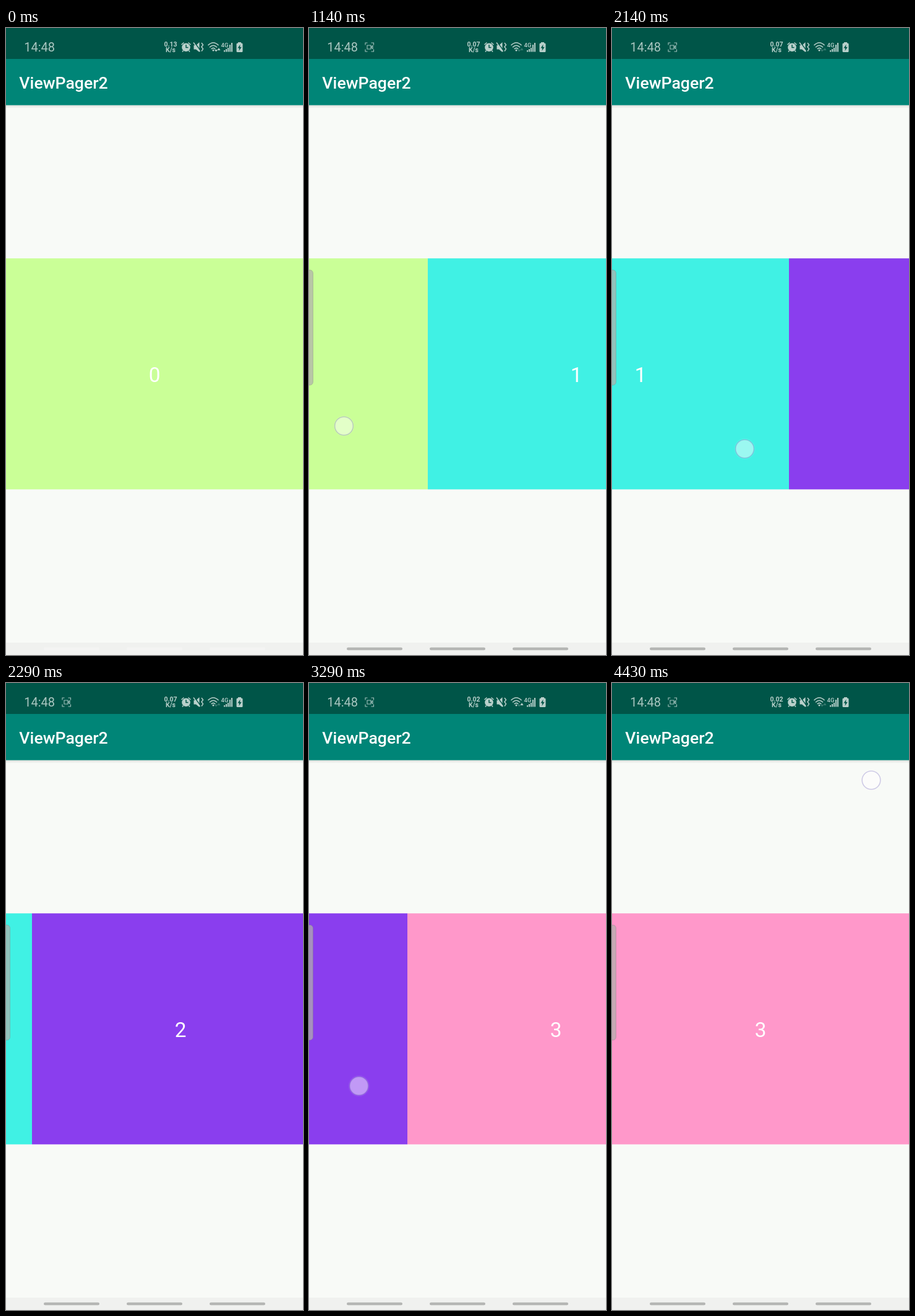
These frames come from a looping animation (480 px wide and 1013 px high, 4.57 s). An HTML page:

```html
<!DOCTYPE html>
<html lang="en">
<head>
<meta charset="utf-8">
<title>ViewPager2</title>
<style>
  html, body { margin: 0; width: 100%; height: 100%; overflow: hidden; background: #f8faf7; }
  svg { display: block; width: 100%; height: 100%; font-family: Roboto, sans-serif; }
  .icon { fill: #b9d0cb; }
  .line { fill: none; stroke: #b9d0cb; stroke-width: 1.5; }
  .thin { fill: none; stroke: #a3c2bc; stroke-width: 1.1; }
  .cut { fill: none; stroke: #005548; stroke-width: 1.5; }
  .tiny { font-weight: 700; font-size: 10.5px; text-anchor: middle; }
</style>
</head>
<body>
<svg viewBox="0 0 480 1013">
  <defs>
    <linearGradient id="shade" x2="0" y2="1">
      <stop stop-color="#000" stop-opacity=".11"/>
      <stop offset="1" stop-color="#000" stop-opacity="0"/>
    </linearGradient>
  </defs>
  <rect width="480" height="1013" fill="#f8faf7"/>
  <g id="pages"></g>

  <rect y="124.700" width="480" height="5" fill="url(#shade)"/>
  <rect y="50" width="480" height="74.700" fill="#008577"/>
  <rect width="480" height="50" fill="#005548"/>
  <text x="21.300" y="97.700" font-size="26.670" font-weight="500" fill="#fff">ViewPager2</text>

  <g class="icon">
    <text x="29.300" y="38" font-size="20" opacity=".92">14:48</text>
    <g id="recorder" class="thin">
      <path d="M91 27.500V24H94.500M100.500 24H104.500V27.500M104.500 34.500V38H100.500M94.500 38H91V34.500"/>
      <path id="camera" d="M94 28H100V34H94ZM100 31L103 28.700V33.300Z"/>
    </g>
    <g class="tiny">
      <text id="speed" x="266" y="30"></text>
      <text x="266" y="39.300">K/s</text>
    </g>
    <!-- alarm -->
    <circle cx="291" cy="31.200" r="6.800"/>
    <path class="line" d="M283.500 27L287.500 23.500M294.500 23.500L298.500 27M286.500 36.500L285 38.500M295.500 36.500L297 38.500"/>
    <path class="cut" d="M291 27V31.500H294.500"/>
    <!-- muted speaker -->
    <path d="M303.500 28H307L312.500 23V39L307 34.500H303.500Z"/>
    <path class="cut" d="M304.300 23L314.300 36.500"/>
    <path class="line" d="M303 23.500L313.500 38M316 24L318.500 27.300L316 30.500L318.500 33.800L316 37.500"/>
    <!-- wifi -->
    <path class="line" d="M326.500 28Q335 19.500 343.500 28M329 31.300Q335 25.300 341 31.300M331.700 34Q335 30.800 338.300 34"/>
    <circle cx="335" cy="36" r="1.500"/>
    <path id="down" d="M337 35H342L339.500 38.500Z"/>
    <path id="up" d="M341.500 36H346.500L344 32Z"/>
    <!-- mobile signal -->
    <text x="347.500" y="30.500" font-size="9.500" font-weight="500">4G</text>
    <path d="M352 36h2v2.500h-2zM355 34h2v4.500h-2zM358 32h2v6.500h-2zM361 27h2v11.500h-2zM364 24h2v14.500h-2z"/>
    <!-- battery -->
    <path d="M375 23H380V24.500H381Q382.500 24.500 382.500 26V37.500Q382.500 39 381 39H374Q372.500 39 372.500 37.500V26Q372.500 24.500 374 24.500H375Z"/>
    <path d="M378.500 26.500L374.500 32.500H377L376.500 37L380.700 30.800H378Z" fill="#005548"/>
  </g>

  <rect id="handle" x="-6" y="391" width="12.500" height="186" rx="5"
    fill="#b2b0ac" fill-opacity=".72" stroke="#777" stroke-opacity=".4" stroke-width=".8"/>

  <rect y="993" width="480" height="20" fill="#f0f1ef"/>
  <g id="nav"></g>

  <g id="touch">
    <circle r="17" fill="#fff" fill-opacity=".08"/>
    <circle r="14.800" fill="#fff" fill-opacity=".43" stroke="#8c82c8" stroke-opacity=".4" stroke-width="1.600"/>
  </g>
</svg>
<script>
const LOOP = 4570, TICK = 1000 / 7, WIDTH = 480;
const $ = id => document.getElementById(id);
const fade = (id, a) => $(id).setAttribute("opacity", a);
const move = (id, x, y) => $(id).setAttribute("transform", `translate(${x} ${y})`);
const clamp = v => Math.min(1, Math.max(0, v));

$("pages").innerHTML = ["#caff97", "#40f1e4", "#8a3eee", "#ff98ca"].map((c, i) =>
  `<g transform="translate(${i * WIDTH})">
    <rect y="372.2" width="${WIDTH}" height="373.2" fill="${c}"/>
    <text x="240" y="571.8" font-size="33.3" text-anchor="middle" fill="#fff">${i}</text>
  </g>`).join("");

const bars = color => [0, 1, 2].map(i =>
  `<rect x="${61 + i * 134}" y="1000.7" width="90" height="4.6" rx="2.3" fill="${color}"/>`).join("");
$("nav").insertAdjacentHTML("beforebegin", bars("#f4f4f3"));
$("nav").innerHTML = bars("#b5b6b4");

// Middle of each swipe in ms, and where the finger is then
const swipes = [
  { mid: 1110, x: 114, y: 643 },
  { mid: 2150, x: 202, y: 680 },
  { mid: 3237, x: 166, y: 651 }
];
const FINGER_SPEED = 1.75;

// Page turn: nothing until the drag slop is passed, then an S-curve that snaps home
const turned = dt => clamp(1.01 - 1.14 / (1 + Math.exp(dt / 57)));

function finger(t) {
  if (t > 4400) return [419, 157];
  const s = swipes.find(s => t > s.mid - 200 && t < s.mid + 100);
  return s && [s.x - FINGER_SPEED * (t - s.mid), s.y];
}

function draw(now) {
  const t = Math.floor((now % LOOP + 5) / TICK) * TICK;

  const scroll = swipes.reduce((sum, s) => sum + turned(t - s.mid), 0) * WIDTH;
  move("pages", -Math.round(scroll), 0);

  const spot = finger(t);
  fade("touch", spot ? 1 : 0);
  if (spot) move("touch", ...spot);

  const shown = t > 0 ? 1 : 0;
  fade("handle", shown);
  fade("recorder", shown);
  fade("camera", (t + 860) % 1000 < 570 ? 1 : 0);
  fade("nav", clamp(t / 400));
  fade("down", t < 400 ? 1 : .3);
  fade("up", t < 400 || t > 2500 && t < 4100 ? 1 : .3);
  $("speed").textContent = t < 280 ? "0.13" : t < 3280 ? "0.07" : "0.02";
  requestAnimationFrame(draw);
}
requestAnimationFrame(draw);
</script>
</body>
</html>
```
